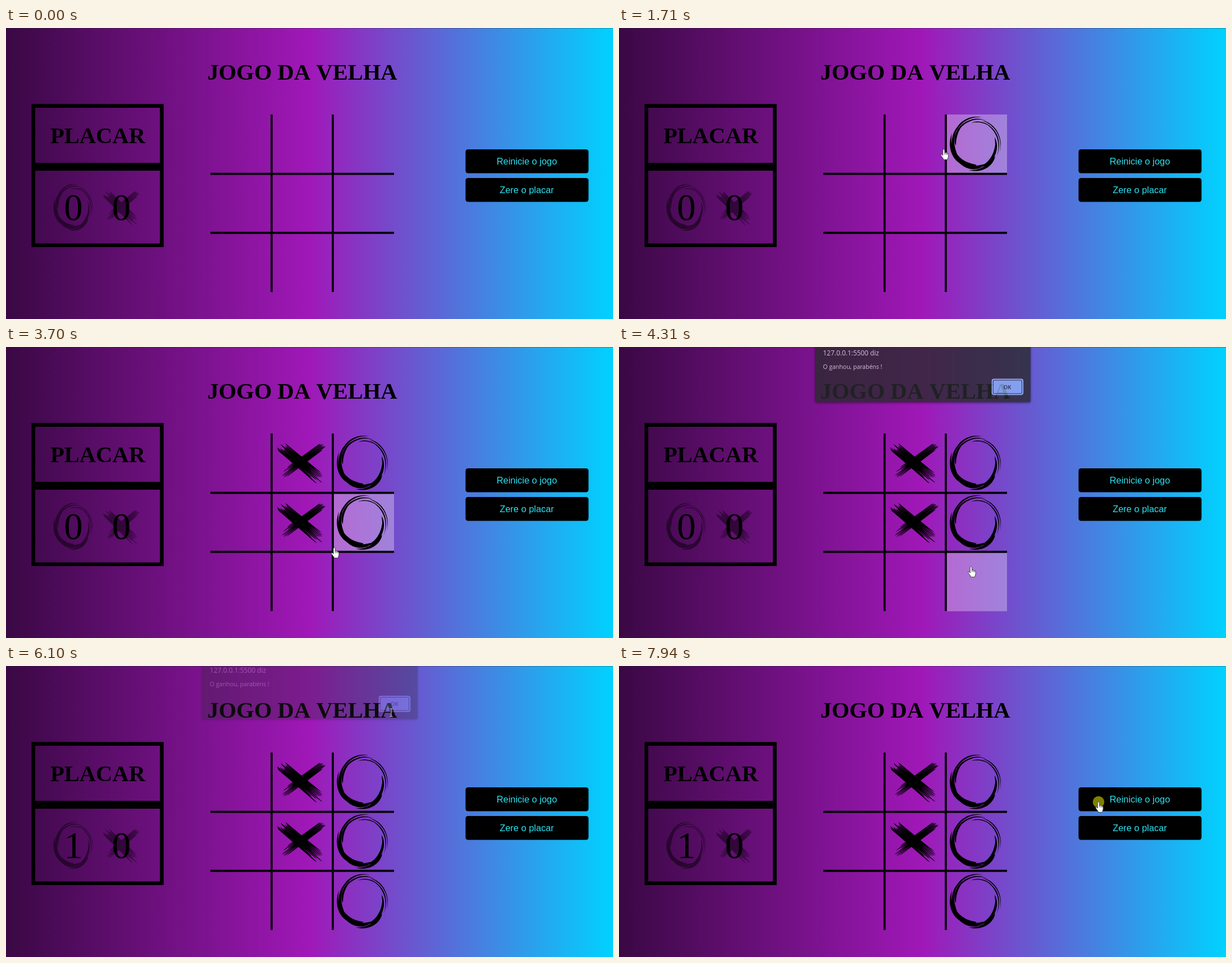
An HTML page for the animation above (8000 ms loop, 1081 by 518 pixels).

```html
<!DOCTYPE html>
<html lang="pt-BR">
<head>
<meta charset="utf-8">
<title>Jogo da velha</title>
<style>
  html, body { margin: 0; width: 100%; height: 100%; overflow: hidden; background: #3a0844; }
  svg { display: block; width: 100%; height: 100%; }
  text { text-anchor: middle; }
  .head { font: bold 40.6px "Liberation Serif", serif; font-kerning: none; }
  .score { font: 67px "Liberation Serif", serif; }
  .label { font: 16.4px "Liberation Sans", sans-serif; fill: #2ce2f2; }
  .dialog { filter: drop-shadow(0 1px 2px rgba(0, 0, 0, .6)); }
  .dialog text { font-family: "Open Sans", "Noto Sans", sans-serif; fill: #e8eaed; text-anchor: start; }
</style>
</head>
<body>
<svg viewBox="0 0 1081 518" preserveAspectRatio="none">
  <defs>
    <linearGradient id="sky">
      <stop offset="0" stop-color="#3a0844"/>
      <stop offset=".5" stop-color="#a018b8"/>
      <stop offset="1" stop-color="#00d2ff"/>
    </linearGradient>
    <path id="O"/>
    <path id="X"/>
  </defs>
  <rect width="1081" height="518" fill="url(#sky)"/>
  <rect width="1081" height="1" fill="#222" opacity=".35"/>

  <text class="head" x="527.6" y="92">JOGO DA VELHA</text>

  <path d="M45.5 135.3H280.8V390H45.5ZM52 142V240H274V142ZM52 254V383.4H274V254Z" fill-rule="evenodd"/>
  <text class="head" x="163.5" y="205.3">PLACAR</text>
  <g opacity=".48">
    <use href="#O" transform="translate(80.5 274.3) scale(.77 .86)"/>
    <use href="#X" transform="translate(167 274.7) scale(.75 .86)"/>
  </g>
  <text class="score" id="wins" x="120" y="341.7">0</text>
  <text class="score" x="205.5" y="341.7">0</text>

  <rect id="glow" width="107" height="104" fill="#fff" opacity=".31"/>
  <path d="M473 154V470M582 154V470M364 259.6H691M364 364.6H691" stroke="#000" stroke-width="3.6"/>
  <g id="pieces"></g>

  <rect x="818.4" y="216" width="219" height="42.6" rx="4.5"/>
  <rect x="818.4" y="267" width="219" height="42.6" rx="4.5"/>
  <text class="label" x="927.5" y="242.6">Reinicie o jogo</text>
  <text class="label" x="927.5" y="293.6">Zere o placar</text>

  <g id="dialog" class="dialog">
    <rect x="350" y="-30" width="382" height="136.5" rx="3" fill="#292a2d"/>
    <text x="364" y="23.7" font-size="11.9">127.0.0.1:5500 diz</text>
    <text x="364" y="47.5" font-size="10.5">O ganhou, parabéns !</text>
    <rect x="664" y="65.7" width="54.6" height="27.2" rx="3" fill="#8ab4f8" stroke="#9fc2fa" stroke-width="1.6"/>
    <rect x="665.8" y="67.4" width="51" height="23.8" rx="2" fill="none" stroke="#292a2d"/>
    <text x="691" y="82.8" font-size="9.6" font-weight="600" style="fill:#202124;text-anchor:middle">OK</text>
  </g>

  <circle id="ring" r="10.3" fill="#ff0" opacity=".5"/>
  <g id="cursor" stroke-linejoin="round">
    <path id="arrow" fill="#fff" stroke="#111" stroke-width=".9" d="M0 0V13.4L3.1 10.6L5.3 15.6L7.3 14.7L5.2 9.9H9.3Z"/>
    <path id="hand" fill="#fff" stroke="#222" stroke-width=".8" d="M-1.7 1Q0 -1.4 1.6 1V6Q5 5 6.2 7.2Q8 6.6 8.2 9V13L6.6 18.4H-.8V16.8L-5.2 10.8Q-5.6 8.6 -3.6 9L-1.7 11ZM1.6 6V9.4M4 6.4V9.6M6.2 7.2V10"/>
    <path id="beam" fill="none" stroke="#c9a8d8" stroke-width="1.2" d="M-3 -7H3M0 -7V7M-3 7H3"/>
  </g>
</svg>
<script>
const LOOP = 8000, START = 120, STEP = 69.3;
const ALERT = 4200, DISMISS = 5960, SCORED = 6030;
const CLICKS = [1240, 2060, 2670, 3360, 4140, DISMISS, 7940];

// Pointer stops: time, x, y
const STOPS = [
  [START, 996, 503], [880, 640, 242], [1240, 633, 212], [1710, 579, 216],
  [2060, 526, 209], [2540, 600, 300], [2940, 600, 300], [3010, 586, 293],
  [3360, 527, 311], [3990, 627, 391], [4640, 627, 391], [5470, 680, 101],
  [5750, 686, 83], [6300, 686, 83], [7070, 803, 220], [7670, 854, 242]
];

const $ = id => document.getElementById(id);
const set = (el, attrs) => { for (const k in attrs) el.setAttribute(k, attrs[k]); };
const show = (el, on) => { el.style.display = on ? '' : 'none'; };
const mix = (a, b, u) => a + (b - a) * u;
const polygon = pts => 'M' + pts.map(p => p.map(v => v.toFixed(1)).join(' ')).join('L') + 'Z';

let seed = 7;
const random = () => (seed = seed * 16807 % 2147483647) / 2147483647;

// Ring: overlapping tapered arcs that spiral outwards, heaviest at the lower left
function ringPath() {
  const arcs = 13, parts = 24;
  let d = '';
  for (let k = 0; k < arcs; k++) {
    const a0 = (k + random() * .4) / arcs * 2 * Math.PI;
    const sweep = 1.2 + random() * .5;
    const heavy = (1 + Math.cos(a0 + sweep / 2 - 2.2)) / 2;
    const r0 = .77 + .055 * (k * 2 % 3), w = .03 + .1 * heavy;
    const outer = [], inner = [];
    for (let i = 0; i <= parts; i++) {
      const u = i / parts, a = a0 + sweep * u;
      const r = r0 + .11 * u, h = w / 2 * Math.sin(Math.PI * u ** .7);
      const at = q => [51 + 46 * q * Math.cos(a), 52 + 49 * q * Math.sin(a)];
      outer.push(at(r + h));
      inner.unshift(at(r - h));
    }
    d += polygon([...outer, ...inner]);
  }
  return d;
}

// Brush stroke: parallel bristles with ragged ends that thin out along the way
function brush(x0, y0, x1, y1, width, bristles) {
  const len = Math.hypot(x1 - x0, y1 - y0);
  const nx = (y0 - y1) / len, ny = (x1 - x0) / len;
  const at = (u, o) => [mix(x0, x1, u) + nx * o, mix(y0, y1, u) + ny * o];
  let d = '';
  for (let i = 0; i < bristles; i++) {
    const o = (i / (bristles - 1) - .5) * width, h = width / bristles * .75;
    const from = random() * .14, to = 1 - random() * .22, mid = mix(.45, .65, random());
    d += polygon([
      at(from, o - h * .5), at(mid, o - h), at(to, o * 1.15 - h * .3),
      at(to - .04, o * 1.15 + h * .4), at(mid, o + h), at(from + .04, o + h * .6)
    ]);
  }
  return d;
}

set($('O'), { d: ringPath() });
set($('X'), { d: brush(9, 18, 91, 87, 17, 9) + brush(97, 16, 11, 79, 11, 7) });

function pointer(t) {
  const i = STOPS.findIndex(s => s[0] > t);
  if (i <= 0) return STOPS[i ? STOPS.length - 1 : 0].slice(1);
  const [t0, x0, y0] = STOPS[i - 1], [t1, x1, y1] = STOPS[i];
  const u = (t - t0) / (t1 - t0);
  return [mix(x0, x1, u), mix(y0, y1, u)];
}

// Cell under the pointer, frozen while the dialog blocks the page
function cellAt(t) {
  const [x, y] = pointer(t > ALERT && t < SCORED ? ALERT : t);
  const col = Math.floor((x - 364) / 107), row = Math.floor((y - 154) / 105.4);
  if (t < START || Math.min(col, row) < 0 || Math.max(col, row) > 2) return null;
  return { x: 366 + col * 109, y: 154 + row * 106.2 };
}

const pieces = CLICKS.filter(c => c < ALERT).map((at, i, all) => {
  const el = document.createElementNS('http://www.w3.org/2000/svg', 'use');
  const { x, y } = cellAt(at);
  set(el, { href: i % 2 ? '#X' : '#O', x, y });
  $('pieces').append(el);
  return { el, at: i === all.length - 1 ? SCORED : at };
});

function drawDialog(t) {
  const u = Math.min(1, (t - 4180) / 240), v = Math.max(0, (t - DISMISS) / 170);
  const open = t >= ALERT && v < 1;
  show($('dialog'), open);
  if (!open) return;
  const s = 1 + Math.max(v, 1 - u) * .007;
  set($('dialog'), {
    opacity: v ? 1 - v : 1 - (1 - u) ** 3,
    transform: `translate(${541 - 541 * s} ${v ? -17 * v : -14 * (1 - u)}) scale(${s} 1)`
  });
}

function drawCursor(t, cell) {
  const [x, y] = pointer(t);
  const hand = x > 818 && y > 216 && y < 259 || cell && t < 4680;
  const beam = t > SCORED && t < 6450;
  show($('cursor'), t >= START);
  show($('hand'), hand);
  show($('beam'), beam);
  show($('arrow'), !hand && !beam);
  set($('cursor'), { transform: `translate(${x} ${y})` });
  show($('ring'), CLICKS.some(c => t >= c && t < c + STEP));
  set($('ring'), { cx: x, cy: y });
}

function draw(time) {
  const step = Math.floor((time - START + 25) / STEP);
  const t = step < 0 ? 0 : START + step * STEP;
  const cell = cellAt(t);
  show($('glow'), cell);
  if (cell) set($('glow'), cell);
  for (const p of pieces) show(p.el, t >= p.at);
  $('wins').textContent = t >= SCORED ? 1 : 0;
  drawDialog(t);
  drawCursor(t, cell);
}

const began = performance.now();
function tick() {
  draw((performance.now() - began) % LOOP);
  requestAnimationFrame(tick);
}
tick();
</script>
</body>
</html>
```
